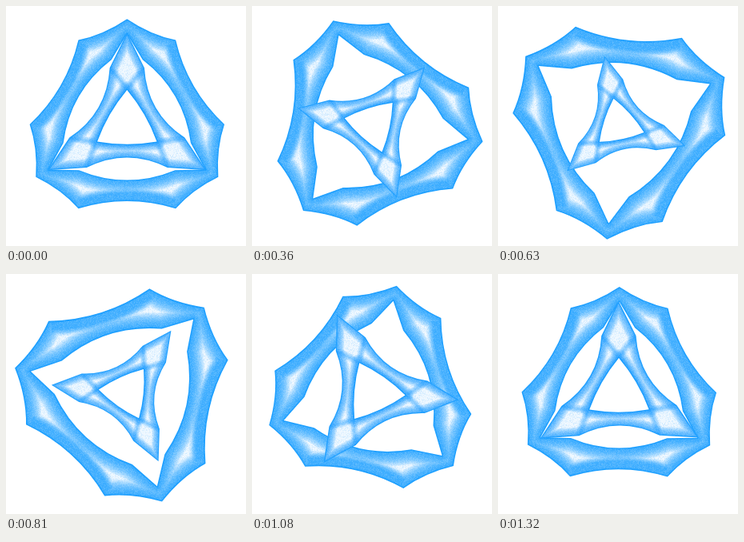
An HTML page with a canvas that plays this animation: 300 by 300 pixels, repeating every 1.35 s.

```html
<!DOCTYPE html>
<html lang="en">
<head>
<meta charset="utf-8">
<title>Rotating triangles</title>
<style>
  html, body { margin: 0; width: 100%; height: 100%; overflow: hidden; background: #fff; }
  canvas { display: block; width: 300px; height: 300px; }
</style>
</head>
<body>
<canvas id="stage" width="300" height="300"></canvas>
<script>
const SIZE = 300, LOOP = 1350, STEP = 30;
const CX = 151.3, CY = 147.9;
const BLUE = [12, 152, 255];
const ctx = document.getElementById('stage').getContext('2d');

function makeCanvas() {
  const c = document.createElement('canvas');
  c.width = c.height = SIZE;
  return c;
}

const polar = (r, deg) => {
  const a = deg * Math.PI / 180;
  return [r * Math.cos(a), r * Math.sin(a)];
};

// Each sector is a list of [radius, angle] points; four numbers add a
// control point: [controlRadius, controlAngle, radius, angle].
function closed(sector) {
  const path = new Path2D();
  const [r0, a0] = sector[0];
  path.moveTo(...polar(r0, a0));
  for (let turn = 0; turn < 360; turn += 120) {
    sector.forEach((p, i) => {
      if (p.length === 4) {
        path.quadraticCurveTo(...polar(p[0], p[1] + turn), ...polar(p[2], p[3] + turn));
      } else if (turn || i) {
        path.lineTo(...polar(p[0], p[1] + turn));
      }
    });
  }
  path.closePath();
  return path;
}

function arcs(r, spread, control) {
  const path = new Path2D();
  for (let mid = -30; mid < 330; mid += 120) {
    path.moveTo(...polar(r, mid - spread));
    path.quadraticCurveTo(...polar(control, mid), ...polar(r, mid + spread));
  }
  return path;
}

function makeRing(edge, hole, lines, glow, lineGlow, alpha) {
  const body = new Path2D(edge);
  body.addPath(hole);
  return { body, lines, glow, lineGlow, alpha, layer: makeCanvas() };
}

const outer = makeRing(
  closed([[131.7, -90], [115.5, -75, 121.7, -60], [87, -30, 121.7, 0], [115.5, 15, 131.7, 30]]),
  closed([[113, -90], [83, -76.4], [82, -30, 83, 16.4], [113, 30]]),
  arcs(113, 32, 76), 18, 6, 0.09);

const inner = makeRing(
  closed([[114.5, -90], [74, -73], [29, -30, 74, 13], [114.5, 30]]),
  closed([[43, -90], [28, -30, 43, 30]]),
  arcs(74, 77, 32), 11, 5, 0.115);

// Seeded fine grain
const grain = (() => {
  const c = makeCanvas(), g = c.getContext('2d');
  const img = g.createImageData(SIZE, SIZE);
  let seed = 7;
  const random = () => (seed = (seed * 16807) % 2147483647) / 2147483647;
  for (let i = 0; i < img.data.length; i += 4) {
    const v = random() - 0.5;
    img.data.set(v > 0 ? [255, 255, 255] : BLUE, i);
    img.data[i + 3] = Math.abs(v) * 75;
  }
  g.putImageData(img, 0, 0);
  return c;
})();

// Stacked strokes that fade with the distance from the path
function glowAlong(g, path, reach, alpha) {
  g.globalAlpha = alpha;
  for (let h = 1; h <= reach; h++) {
    g.lineWidth = 2 * h;
    g.stroke(path);
  }
}

function drawRing(ring, angle, scale) {
  const g = ring.layer.getContext('2d');
  g.setTransform(1, 0, 0, 1, 0, 0);
  g.globalCompositeOperation = 'source-over';
  g.globalAlpha = 1;
  g.clearRect(0, 0, SIZE, SIZE);

  g.translate(CX, CY);
  g.rotate(angle * Math.PI / 180);
  g.scale(scale, scale);
  g.lineJoin = 'round';
  g.fillStyle = '#eff8ff';
  g.fill(ring.body, 'evenodd');

  g.globalCompositeOperation = 'source-atop';
  g.strokeStyle = `rgb(${BLUE})`;
  glowAlong(g, ring.body, ring.glow, ring.alpha);
  glowAlong(g, ring.lines, ring.lineGlow, ring.alpha);

  g.save();
  g.setTransform(1, 0, 0, 1, 0, 0);
  g.globalAlpha = 1;
  g.drawImage(grain, 0, 0);
  g.restore();

  g.globalAlpha = 0.6;
  g.lineWidth = 3;
  g.stroke(ring.body);
  ctx.drawImage(ring.layer, 0, 0);
}

const smooth = u => u * u * (3 - 2 * u);

// Quick start, soft end: cubic-bezier(1/6, 0, 2/3, 1)
function settle(x) {
  let lo = 0, hi = 1;
  for (let i = 0; i < 24; i++) {
    const s = (lo + hi) / 2, q = 1 - s;
    if (0.5 * s * q * q + 2 * s * s * q + s * s * s < x) lo = s; else hi = s;
  }
  return smooth(lo);
}

function draw(t) {
  const turn = smooth(t / LOOP);
  const half = LOOP / 2, low = 600;
  const grow = smooth(1 - Math.abs(t - half) / half);
  const shrink = t < low ? smooth(t / low) : 1 - settle((t - low) / (LOOP - low));

  ctx.fillStyle = '#fff';
  ctx.fillRect(0, 0, SIZE, SIZE);
  drawRing(outer, -120 * turn, 1 + 0.1 * grow);
  drawRing(inner, 240 * turn, 1 - 0.24 * shrink);
}

let last = -1;
function tick() {
  const t = Math.floor(performance.now() % LOOP / STEP) * STEP;
  if (t !== last) draw(last = t);
  requestAnimationFrame(tick);
}
tick();
</script>
</body>
</html>
```
